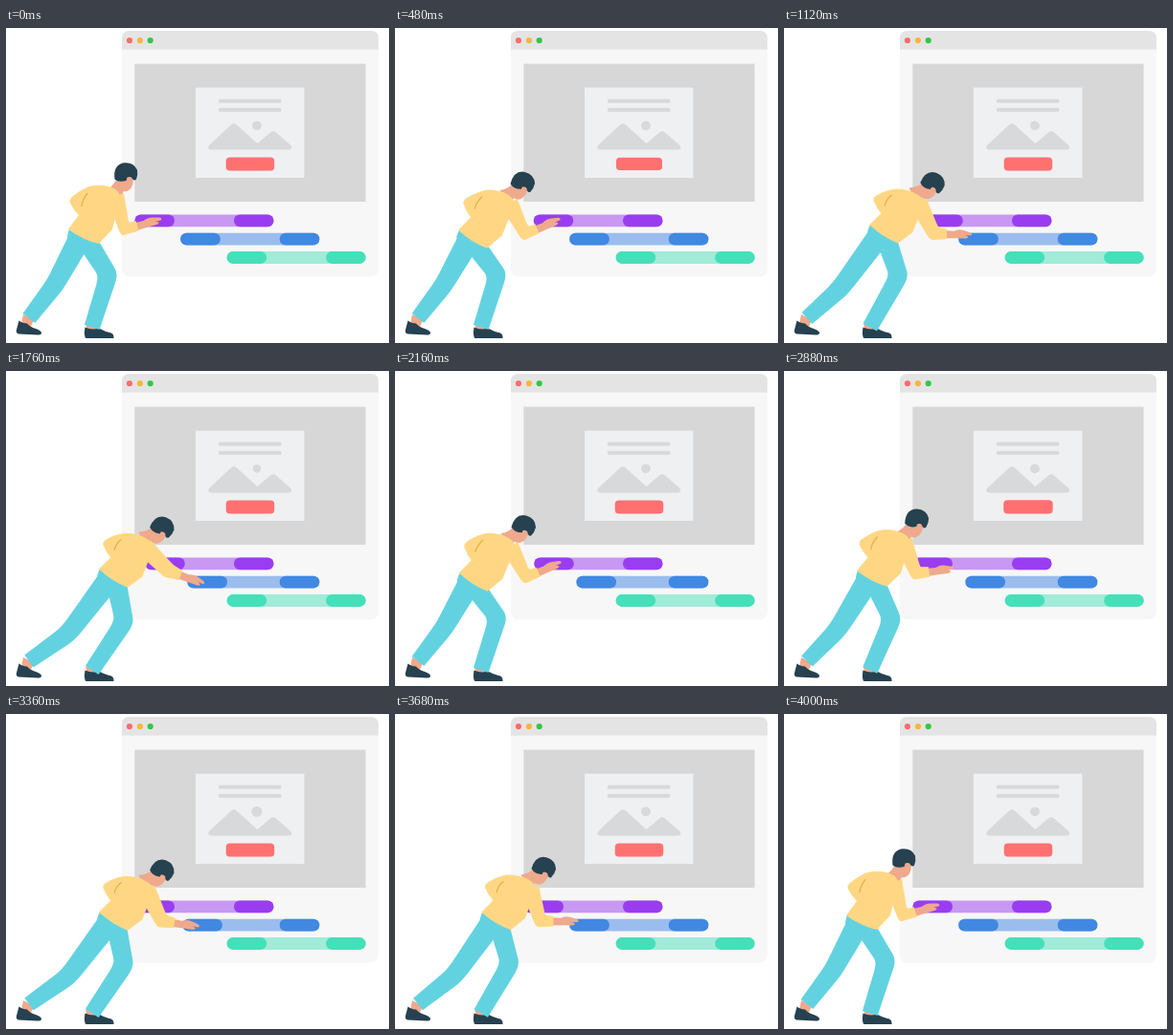
Recreate the animation shown at these times as an HTML page. Size 400 by 330 pixels, loop 4.08 s.

```html
<!DOCTYPE html>
<html lang="en">
<head>
<meta charset="utf-8">
<title>Adjusting sliders</title>
<style>
  html, body { margin: 0; width: 100%; height: 100%; overflow: hidden; background: #fff; }
  svg { display: block; width: 100vw; height: 100vh; }
</style>
</head>
<body>
<svg viewBox="0 0 400 330">
  <rect x="121" y="3" width="268" height="257.500" rx="8" fill="#f7f7f7"/>
  <path d="M121 22.500V11Q121 3 129 3H381Q389 3 389 11V22.500Z" fill="#e4e4e4"/>
  <circle cx="129" cy="13" r="3.100" fill="#ff6c69"/>
  <circle cx="140" cy="13" r="3.100" fill="#f7b63f"/>
  <circle cx="150.700" cy="13" r="3.100" fill="#32c745"/>
  <rect x="134.300" y="37.500" width="241.300" height="144.500" fill="#d7d7d7"/>
  <rect x="198" y="62.500" width="113.500" height="94.500" fill="#eff0f2"/>
  <g fill="#d8d9da">
    <rect x="222" y="74.500" width="65.500" height="4" rx="1.500"/>
    <rect x="222" y="83.800" width="65.500" height="4" rx="1.500"/>
    <path d="M213.500 127.500Q209.500 126 212.500 122.500L235 101.500Q238 98.500 241 101.500L262.500 121L276 109.500Q279 107 282 109.500L297 122.500Q300 126.500 296 127.500Z"/>
    <circle id="sun" cx="262" cy="102.300"/>
  </g>
  <rect id="button" fill="#ff7170"/>
  <g id="bars"></g>

  <g fill="#efa98c">
    <path d="M18 300L29 306L26 313L16 310Z"/>
    <path d="M83 310L97 311L95 318L85 317Z"/>
  </g>
  <g fill="#26414f">
    <path d="M13.500 306.500Q17 309.500 22 309.500Q25 313 31 315Q37 317 37 319.500Q37 321.500 33 321.500L13 320.500Q10 319.500 11 316Z"/>
    <path d="M82.500 313.500Q90 317 97 314.500Q103 318 110 319.500Q113 321 112.500 325H83.500Q81 323 82.500 313.500Z"/>
  </g>
  <g fill="#62d2e1">
    <path id="backLeg"/>
    <path id="frontLeg"/>
  </g>
  <g id="torso">
    <g id="head">
      <path d="M106 169Q114 164 116 156L132 153Q134 162 131 167Q128 172 123 171L119 178Z" fill="#efa98c"/>
      <path d="M113.500 158.500Q111.500 143.500 123 141.300Q133 140 137 148.500Q138 154 136 158.500Q133.500 161 131 156.500Q128 154.500 126 159.500Q119 162.500 113.500 158.500Z" fill="#26414f"/>
      <circle cx="128.300" cy="158.300" r="2.300" fill="#efa98c"/>
    </g>
    <g id="trunk">
      <path d="M66 210L97 225L95 235Q84 239 67 229L64 218Z" fill="#62d2e1"/>
      <path d="M89 165.500C98 164 108 165 115 169.500C122 175 119 184 115 195L111 211L97 226Q80 222 65 211L76 196Q70 190 67 183.500Q65 180 70 176Q80 168 89 165.500Z" fill="#ffd784"/>
      <path d="M85 173.500Q80 179 79 186.500" fill="none" stroke="#e5b04f" stroke-width="1.300" stroke-linecap="round"/>
    </g>
  </g>
  <path id="hand" fill="#efa98c" d="M8 -4L21 -3.500Q26 -6 31 -4.500L38 -2.500Q40.500 -1 39 .5L33 .5L36 2Q36 3.500 33 4L24 4L8 4.500Z"/>
  <path id="sleeve" fill="#ffd784"/>
</svg>
<script>
const LOOP = 4080;
const $ = id => document.getElementById(id);
const set = (el, attrs) => { for (const k in attrs) el.setAttribute(k, attrs[k]); };
const mix = (a, b, k) => a + (b - a) * k;
const mixPt = (p, q, k) => [mix(p[0], q[0], k), mix(p[1], q[1], k)];
const phase = (t, from, to) => Math.min(1, Math.max(0, (t - from) / (to - from)));
const ramp = (t, from, to) => (1 - Math.cos(Math.PI * phase(t, from, to))) / 2;
const bump = (t, from, to) => Math.sin(Math.PI * phase(t, from, to)) ** 2;

// One slider; returns a function that moves its left end.
function addBar(x, y, light, dark) {
  const length = 145, knobWidth = 41.5, right = x + length;
  const make = (left, width, fill) => {
    const r = document.createElementNS("http://www.w3.org/2000/svg", "rect");
    set(r, { x: left, y, width, height: 12.8, rx: 6.2, fill });
    return $("bars").appendChild(r);
  };
  const base = make(x, length, light), knob = make(x, knobWidth, dark);
  make(right - knobWidth, knobWidth, dark);
  return left => {
    set(base, { x: left, width: right - left });
    set(knob, { x: left });
  };
}
const movePurple = addBar(134.5, 195.5, "#c898f2", "#9a3df0");
const moveBlue = addBar(182.3, 214.8, "#9bbdee", "#4088e2");
addBar(230.7, 234.1, "#a1ebd9", "#45e0b9");

// Tapered two-part limb with a slightly rounded joint.
function limb(a, b, c, wa, wb, wc) {
  const normal = (p, q) => {
    const d = Math.hypot(q[0] - p[0], q[1] - p[1]);
    return [(p[1] - q[1]) / d, (q[0] - p[0]) / d];
  };
  const n0 = normal(a, b), n2 = normal(b, c);
  const m = [n0[0] + n2[0], n0[1] + n2[1]], s = Math.hypot(...m);
  const n1 = [m[0] / s, m[1] / s];
  const off = (p, n, w) => [p[0] + n[0] * w / 2, p[1] + n[1] * w / 2];
  const side = sign => [off(a, n0, sign * wa), off(b, n1, sign * wb), off(c, n2, sign * wc)];
  const curve = ([p, q, r]) => `${p}L${mixPt(p, q, .84)}Q${q} ${mixPt(q, r, .16)}L${r}`;
  return `M${curve(side(1))}L${curve(side(-1).reverse())}Z`;
}

// Bend the elbow so that the fingertips meet the slider.
function drawArm(shoulder, tip) {
  const upper = 36.4, fore = 39.6;
  const dx = tip[0] - shoulder[0], dy = tip[1] - shoulder[1];
  const d = Math.min(Math.hypot(dx, dy), upper + fore - .1);
  const bend = Math.acos((upper * upper + d * d - fore * fore) / (2 * upper * d));
  const a = Math.atan2(dy, dx) + bend;
  const elbow = [shoulder[0] + upper * Math.cos(a), shoulder[1] + upper * Math.sin(a)];
  const turn = Math.atan2(tip[1] - elbow[1], tip[0] - elbow[0]) * 180 / Math.PI;
  set($("hand"), { transform: `translate(${elbow}) rotate(${turn})` });
  set($("sleeve"), { d: limb(shoulder, elbow, mixPt(elbow, tip, .34), 19, 16, 10.5) });
}

function draw(t) {
  // Progress of each slider, of the step from purple to blue, and of the push stance.
  const purple = ramp(t, 0, 560) - ramp(t, 2200, 2760);
  const blue = ramp(t, 1200, 1720) - ramp(t, 3040, 3540);
  const step = ramp(t, 560, 1200) - ramp(t, 1760, 2200) + ramp(t, 2760, 3060) - ramp(t, 3540, 4010);
  const stance = step * ramp(t, 1200, 1720);

  const purpleX = 134.5 + 10.8 * purple, blueX = 182.3 + 7.2 * blue;
  movePurple(purpleX);
  moveBlue(blueX);

  const hip = [81 + 20 * step + 7 * stance, 219 + mix(2.8 * purple, .5 + 1.5 * stance, step)];
  const angle = mix(7.8 * purple, 10, step);
  const c = Math.cos(angle * Math.PI / 180), s = Math.sin(angle * Math.PI / 180);
  const fromHip = (x, y) => [hip[0] + x * c - y * s, hip[1] + x * s + y * c];
  set($("torso"), { transform: `translate(${hip}) rotate(${angle}) translate(-81 -219)` });
  set($("head"), { transform: `rotate(${2 * angle} 123 154)` });
  set($("trunk"), {
    transform: `translate(117 168) skewX(${4 * step}) scale(1 ${1 - .08 * step}) translate(-117 -168)`
  });

  const sx = 3 * step, sy = -4 * step;
  const backKnee = [51 + 8 * step + 6 * stance, 269 + 4 * step + 2 * stance];
  const frontKnee = [107 + 13.5 * step + 3 * stance, 259 + step + 3 * stance];
  set($("backLeg"), { d: limb(fromHip(sx - 4, sy + 2), backKnee, [24, 304], 24, 19.5, 16) });
  set($("frontLeg"), { d: limb(fromHip(sx + 6, sy + 8), frontKnee, [89.8, 313.5], 21, 20.5, 16.5) });

  const tip = mixPt([purpleX + 28, 200.5], [blueX + 14.8 + 2.7 * stance, 217.5 + 5.5 * stance], step);
  drawArm(fromHip(33 - 4 * blue * step, -43), tip);

  const k = 1 - .05 * bump(t, 40, 960) + .1 * bump(t, 2160, 3000);
  const w = 50.5 * k, h = 14 * k;
  set($("button"), { x: 255 - w / 2, y: 142.4 - h / 2, width: w, height: h, rx: 4 * k });
  set($("sun"), { r: 4.9 * (1 - .13 * bump(t, 1200, 2240) + .14 * bump(t, 3040, 3800)) });
}

const start = performance.now();
function tick() {
  draw((performance.now() - start) % LOOP);
  requestAnimationFrame(tick);
}
tick();
</script>
</body>
</html>
```
